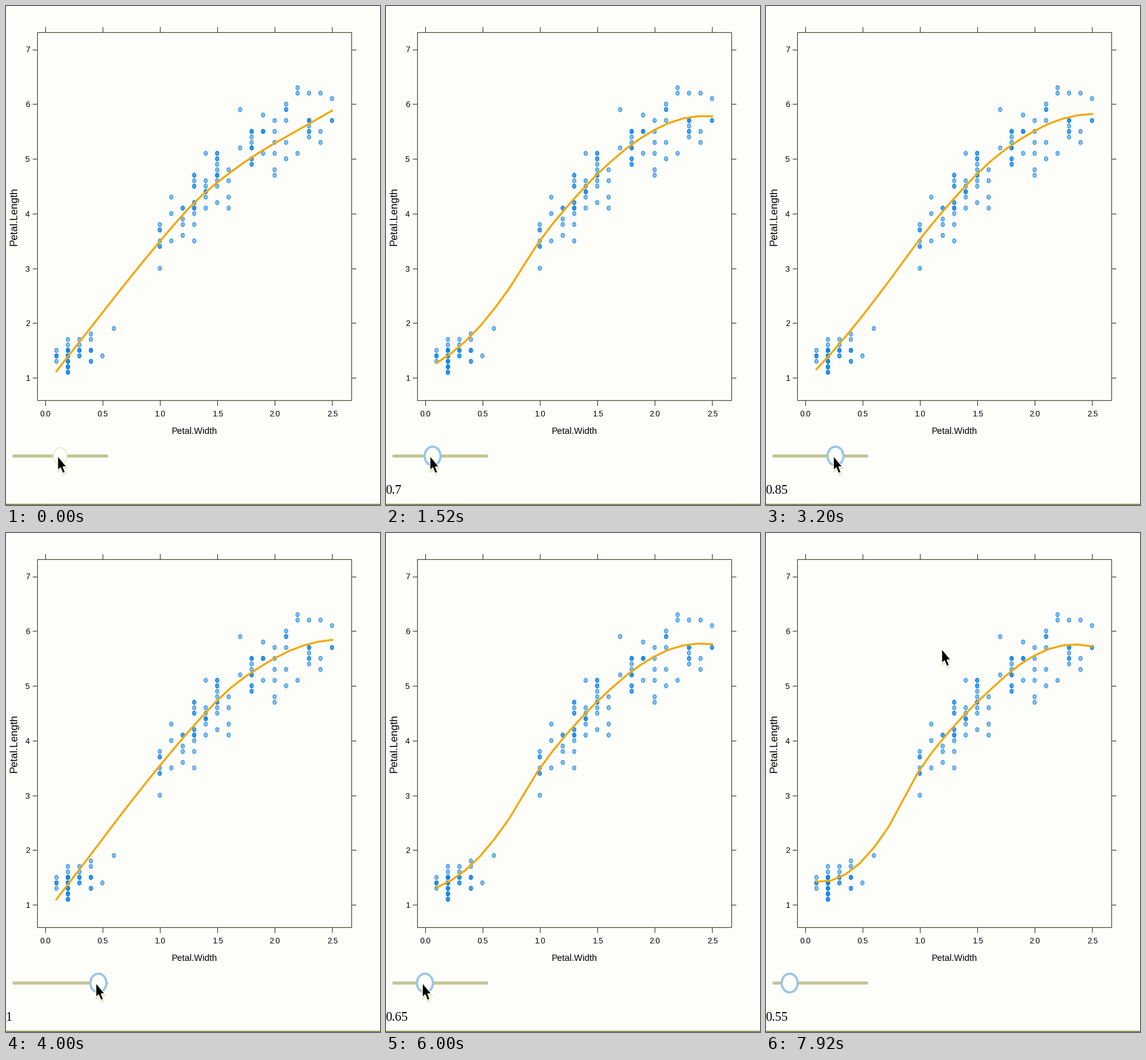
A matplotlib script that plays this animation: 600x800 px, repeating every 8000 ms.

```python
import numpy as np
import matplotlib.pyplot as plt
from matplotlib.animation import FuncAnimation
from matplotlib.collections import EllipseCollection
from matplotlib.patches import Ellipse, Polygon, Rectangle

W, H, DPI = 600, 800, 100
FRAMES, STEP = 100, 80
PT = 72 / DPI  # points per pixel

PAPER, INK, LINE = "#fdfdfa", "black", "#4c4c40"
BLUE, EDGE, ORANGE = "#0a84f5", "#1c86d8", "#f0a808"
TRACK, GLOW = "#c6c496", "#9ac6e4"

LEFT, RIGHT, TOP, BOTTOM = 49.5, 553.5, 41.5, 631.5
SLIDER_Y = 721.5

# Smoother lengths at widths 0.1, 0.4 ... 2.5: straight, widest and tightest fit
STRAIGHT = [1.12, 1.92, 2.72, 3.49, 4.20, 4.73, 5.16, 5.52, 5.88]
LOOSE = [1.10, 1.92, 2.75, 3.54, 4.28, 4.93, 5.38, 5.70, 5.84]
TIGHT = [1.42, 1.62, 2.33, 3.47, 4.27, 4.90, 5.43, 5.72, 5.72]

# The slider rests at each span until the next drag starts
DRAG_TIMES = [1100, 1300, 2700, 3680, 4160, 4960, 5280, 5840, 6160, 6720]
DRAG_SPANS = [.75, .70, .70, 1.0, 1.0, .80, .80, .65, .65, .55]
FOCUS_AT, FIT_AT = 400, 960
LEAVE, ARRIVE, EXIT = 7200, 7840, (282, 186)


def px(width):
    return 62.5 + 184.2 * np.asarray(width)


def py(length):
    return 596 - 87.75 * (np.asarray(length) - 1)


def handle_x(span):
    return 87 + 245 * (span - 0.75)


def smooth(knots, width):
    """Cubic curve through knots spaced 0.3 apart from width 0.1."""
    y = np.asarray(knots, float)
    slope = np.gradient(y, edge_order=2)
    u = (np.asarray(width) - 0.1) / 0.3
    k = np.clip(u.astype(int), 0, len(y) - 2)
    s = u - k
    return (y[k] * (1 + 2 * s) * (1 - s) ** 2 + slope[k] * s * (1 - s) ** 2
            + y[k + 1] * s * s * (3 - 2 * s) + slope[k + 1] * s * s * (s - 1))


def fit_knots(t, span):
    if t < FIT_AT:
        return STRAIGHT
    tightness = ((1 - span) / 0.45) ** 1.6
    return np.array(LOOSE) + tightness * np.subtract(TIGHT, LOOSE)


def flowers(rng):
    """Measurements rounded to 0.1: a low cluster and a rising band."""
    low = np.repeat(np.arange(1, 7) / 10, [5, 29, 7, 7, 1, 1])
    band = np.repeat(np.arange(10, 26) / 10,
                     [7, 3, 5, 13, 8, 12, 4, 2, 12, 5, 6, 6, 3, 8, 3, 3])
    width = np.concatenate([low, band])
    centre = np.concatenate([1.4 + 0.3 * low, smooth(TIGHT, band)])
    spread = np.where(width < 1, 0.17, 0.38)
    noise = np.clip(rng.standard_normal(len(width)), -2.4, 2.4)
    return width, np.round(centre + spread * noise, 1)


fig = plt.figure(figsize=(W / DPI, H / DPI), dpi=DPI, facecolor=PAPER)
ax = fig.add_axes([0, 0, 1, 1])
ax.set_xlim(0, W)
ax.set_ylim(H, 0)
ax.axis("off")


def stroke(xs, ys, width=1.2, color=LINE, **kw):
    return ax.plot(xs, ys, color=color, lw=width * PT, **kw)[0]


def label(x, y, text, size, family="Liberation Sans", **kw):
    style = dict(ha="center", va="baseline", color=INK)
    style.update(kw)
    return ax.text(x, y, text, fontsize=size * PT, family=family, **style)


# Panel, ticks and labels
ax.add_patch(Rectangle((LEFT, TOP), RIGHT - LEFT, BOTTOM - TOP,
                       fill=False, ec=LINE, lw=1.2 * PT))
for value in np.arange(0, 2.6, 0.5):
    x = float(px(value))
    stroke([x, x], [TOP - 8, TOP])
    stroke([x, x], [BOTTOM, BOTTOM + 8])
    label(x + 0.5, 658, f"{value:.1f}", 12.5)
for value in range(1, 8):
    y = float(py(value))
    stroke([LEFT - 7, LEFT], [y, y])
    stroke([RIGHT, RIGHT + 7], [y, y])
    label(34.5, y + 5, str(value), 13)
label(302.5, 686.5, "Petal.Width", 14.3)
label(13, 337, "Petal.Length", 16.6, va="center", rotation=90)
stroke([0, W], [798.8, 798.8], 1.8, "#85854a")

# Points; equal measurements overlap and darken
points = np.column_stack([f(v) for f, v in zip((px, py), flowers(np.random.default_rng(7)))])
n = len(points)
ax.add_collection(EllipseCollection(
    [5.6] * n, [6.8] * n, [0] * n, units="xy", offsets=points,
    offset_transform=ax.transData, facecolors=[(0.04, 0.52, 0.96, 0.5)],
    edgecolors=EDGE, linewidths=0.9 * PT, zorder=2))

# Smoother
fit_widths = np.linspace(0.1, 2.5, 20)
curve = stroke(px(fit_widths), fit_widths, 3.1, ORANGE, zorder=3)

# Slider, value and pointer
stroke([12, 160.5], [720.5, 720.5], 5, TRACK, solid_capstyle="round", zorder=4)
handle = Ellipse((0, SLIDER_Y), 23, 28, fc="#fffffc", zorder=5)
ax.add_patch(handle)
readout = label(-0.5, 782.5, "", 20.5, "Liberation Serif", ha="left")

ARROW = np.array([(0, 0), (0, 22.5), (4.4, 18.6), (8.2, 27.5),
                  (11.8, 25.6), (8.3, 17.3), (14, 17)])
shadow = Polygon(ARROW, fc="#d8d890", ec="#d8d890", lw=2.5 * PT, alpha=0.45, zorder=6)
arrow = Polygon(ARROW, fc="black", ec="#fffff8", lw=1.1 * PT, zorder=7)
ax.add_patch(shadow)
ax.add_patch(arrow)


def draw(i):
    t = i * STEP
    drag = np.interp(t, DRAG_TIMES, DRAG_SPANS)
    span = round(drag * 20) / 20

    curve.set_ydata(py(smooth(fit_knots(t, span), fit_widths)))
    readout.set_text(f"{span:g}" if t >= FIT_AT else "")

    focused = t >= FOCUS_AT
    handle.set_center((handle_x(span), SLIDER_Y))
    handle.set_width(25.5 if focused else 22)
    handle.set_height(30 if focused else 27)
    handle.set_edgecolor(GLOW if focused else "#e4e4b4")
    handle.set_linewidth((3.6 if focused else 1.2) * PT)

    # The pointer drags the handle, then leaves for the panel
    away = np.clip((t - LEAVE) / (ARRIVE - LEAVE), 0, 1)
    away = away * away * (3 - 2 * away)
    grip = np.array([handle_x(drag) - 4, SLIDER_Y])
    pointer = grip + away * (np.array(EXIT) - grip)
    arrow.set_xy(ARROW + pointer)
    shadow.set_xy(ARROW + pointer + (0.6, 2.5))
    return curve, readout, handle, shadow, arrow


anim = FuncAnimation(fig, draw, frames=FRAMES, interval=STEP,
                     repeat=True, repeat_delay=0, blit=False)
plt.show()
```
